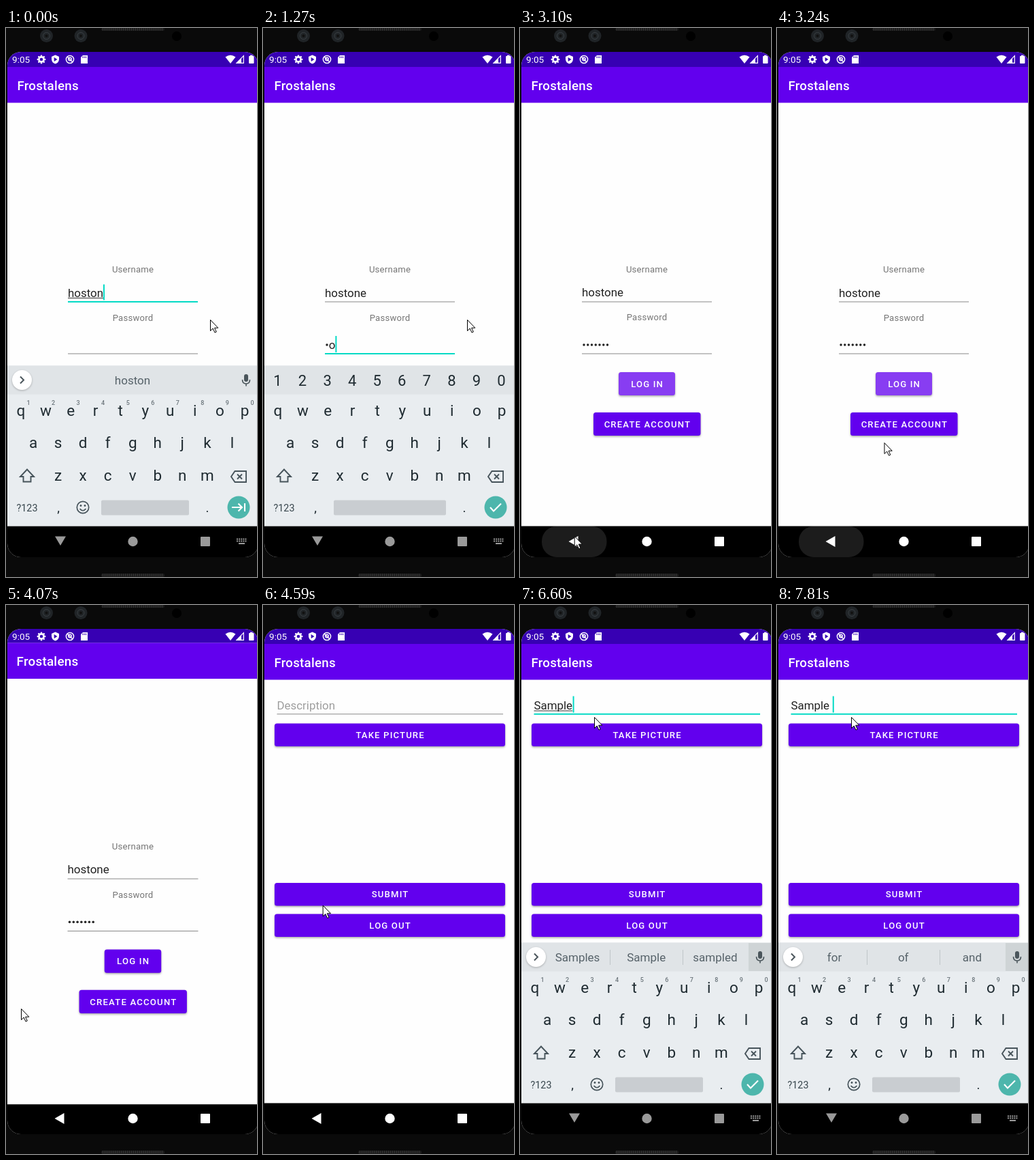
Write an HTML page with a canvas that moves like this. It is 369 px wide and 804 px high and loops after 8 s.

```html
<!DOCTYPE html>
<html lang="en">
<head>
<meta charset="utf-8">
<title>Login and post</title>
<style>
html, body { margin: 0; width: 100%; height: 100%; overflow: hidden; background: #0a0a0a; }
canvas { display: block; }
</style>
</head>
<body>
<canvas id="stage" width="369" height="804"></canvas>
<script>
const c = document.getElementById('stage').getContext('2d');
const TITLE = 'Frostalens', USER = 'hostone', NOTE = 'Sample ';
const PURPLE = '#6200ee', TEAL = '#03dac5', INK = '#1f2b31', DIM = '#566269';
const passKeys = [1210, 1270, 1420, 1510, 1660, 1720, 1800];
const noteKeys = [6160, 6240, 6310, 6390, 6460, 6530, 6810];
const pointer = [[0, 300, 427], [2450, 300, 427], [2760, 79, 745], [3090, 79, 745],
  [3340, 199, 534], [3740, 199, 534], [4070, 22, 591], [4390, 87, 448],
  [4560, 87, 448], [4860, 109, 164], [8000, 109, 164]];

const clamp = u => Math.max(0, Math.min(1, u));
const ramp = (t, a, b) => clamp((t - a) / (b - a));
const decel = u => 1 - (1 - u) * (1 - u);
const smooth = u => u * u * (3 - 2 * u);
const count = (keys, t) => keys.filter(k => k <= t).length;

// y of a cubic bezier at a given x
function bezier(p, x) {
  const at = (i, s) => {
    const r = 1 - s;
    return r * r * r * p[i] + 3 * r * r * s * p[i + 2] + 3 * r * s * s * p[i + 4] + s * s * s * p[i + 6];
  };
  let lo = 0, hi = 1;
  for (let i = 0; i < 24; i++) {
    const m = (lo + hi) / 2;
    if (at(0, m) < x) lo = m; else hi = m;
  }
  return at(1, lo);
}
const extraSlow = x => x < 1 / 6
  ? bezier([0, 0, .05, 0, .1333, .06, .1667, .4], x)
  : bezier([.1667, .4, .2083, .82, .25, 1, 1, 1], x);

function box(x, y, w, h, color, r = 0) {
  c.fillStyle = color;
  c.beginPath();
  c.roundRect(x, y, w, h, r);
  c.fill();
}
function disc(x, y, r, color) {
  c.fillStyle = color;
  c.beginPath();
  c.arc(x, y, r, 0, 7);
  c.fill();
}
function ring(x, y, r, color, w) {
  c.strokeStyle = color;
  c.lineWidth = w;
  c.beginPath();
  c.arc(x, y, r, 0, 7);
  c.stroke();
}
function fill(d, color, x = 0, y = 0) {
  c.save();
  c.translate(x, y);
  c.fillStyle = color;
  c.fill(new Path2D(d));
  c.restore();
}
function line(d, color, w, x = 0, y = 0) {
  c.save();
  c.translate(x, y);
  c.strokeStyle = color;
  c.lineWidth = w;
  c.stroke(new Path2D(d));
  c.restore();
}
function text(s, x, y, size, color, align = 'left', weight = 400, gap = 0) {
  c.font = `${weight} ${size}px Roboto, "Noto Sans", sans-serif`;
  c.letterSpacing = gap + 'px';
  c.textAlign = align;
  c.fillStyle = color;
  c.fillText(s, x, y);
}
const width = (s, size) => {
  c.font = `400 ${size}px Roboto, "Noto Sans", sans-serif`;
  c.letterSpacing = '0px';
  return c.measureText(s).width;
};
function button(label, x, y, w, h, color = PURPLE) {
  c.save();
  c.shadowColor = 'rgba(0,0,0,.35)';
  c.shadowBlur = 3;
  c.shadowOffsetY = 1.5;
  box(x, y, w, h, color, 3.5);
  c.restore();
  text(label, x + w / 2 + .6, y + h / 2 + 4.7, 13.1, '#fff', 'center', 500, 1.17);
}
function field(x, w, y, active) {
  if (active) box(x, y - 1, w, 2, TEAL);
  else box(x, y - .5, w, 1, '#8a8a8a');
}

function phone() {
  box(0, 0, 369, 804, '#0a0a0a');
  for (const y of [0, 799]) {
    box(140, y, 93, y ? 5 : 4, '#1d1d1d', 2);
    for (let x = 142; x < 232; x += 3) box(x, y, 1, 4, '#333');
  }
  for (const x of [59.5, 110]) {
    disc(x, 11.5, 9.5, '#202427');
    ring(x, 11.5, 5, '#3a3f43', 1);
    disc(x, 11.5, 2, '#111');
  }
  disc(251, 12, 7, '#000');
}

function shell() {
  box(2, 35, 369, 740, '#fefefe');
  box(2, 729.5, 369, 46, '#000');
}
function appBar() {
  box(2, 57, 369, 52.5, PURPLE);
  text(TITLE, 16.5, 91, 18.75, '#fff', 'left', 500, .23);
}

function loginScreen(t) {
  const pan = 49 * (decel(ramp(t, 1880, 2130)) - decel(ramp(t, 2880, 3110)));
  const inPass = t >= 620 && t < 1880;
  shell();
  c.save();
  c.beginPath();
  c.rect(2, 35, 369, 694.5);
  c.clip();
  c.translate(0, -pan);
  appBar();
  text('Username', 186.5, 358, 13.1, '#757575', 'center', 400, .23);
  text('Password', 186.5, 428.5, 13.1, '#757575', 'center', 400, .23);

  const name = t < 90 ? USER.slice(0, -1) : USER;
  text(name, 91, 393.5, 16.9, '#222');
  field(91, 191, 401, t < 620);
  if (t < 620) {
    const w = width(name, 16.9);
    box(91, 395, w, 1, '#333');
    box(91 + w, 375.5, 2, 23, TEAL);
  }

  const n = count(passKeys, t), dots = inPass ? Math.max(0, n - 1) : n;
  for (let i = 0; i < dots; i++) disc(94 + 5.75 * i, 464, 1.75, '#222');
  field(91, 191, 477, inPass);
  if (inPass) {
    let x = 91 + 5.75 * dots;
    if (n) {
      text(USER[n - 1], x, 470, 16.9, '#222');
      x += width(USER[n - 1], 16.9);
    }
    if (t < 1060 || t >= 1210) box(x, 451, 2, 24, TEAL);
  }

  button('LOG IN', 145, 504, 83, 34, t >= 1880 && t < 3440 ? '#883df2' : PURPLE);
  const press = ramp(t, 3440, 3665), fade = 1 - ramp(t, 3600, 3900);
  if (press > 0 && fade > 0) {
    c.save();
    c.beginPath();
    c.roundRect(145, 504, 83, 34, 3.5);
    c.clip();
    disc(199 - 12 * press, 534 - 13 * press, 10 + 40 * press, `rgba(255,255,255,${.24 * fade})`);
    c.restore();
  }
  button('CREATE ACCOUNT', 108, 563, 157.5, 34);
  c.restore();
  box(2, 35, 369, 22, '#3700b3');
}

function postScreen(t) {
  shell();
  box(2, 35, 369, 22, '#3700b3');
  appBar();
  const note = NOTE.slice(0, count(noteKeys, t)), w = width(note, 16.9);
  text(note || 'Description', 20.5, 152.5, 16.9, note ? '#222' : '#9e9e9e');
  field(20.5, 332.5, 159.7, t >= 4990);
  if (note && t < 6810) box(20.5, 154.5, w, 1, '#333');
  const off = t < 5090 || (t >= 5590 && t < 6090) || (t >= 7310 && t < 7810);
  if (!off) box(20.5 + w + .5, 133.5, 2, 24, TEAL);
  button('TAKE PICTURE', 17, 173.5, 339, 33.5);
  button('SUBMIT', 17, 407, 339, 33.5);
  button('LOG OUT', 17, 452.5, 339, 33.5);
}

function toolbar() {
  ring(71, 514, 5, DIM, 2);
  line('M75 518l6 6', DIM, 2.2);
  line('M121 508h10q3 0 3 3v7l-5 5h-8q-3 0-3-3v-9q0-3 3-3z', DIM, 1.7);
  line('M122 515q4 6 8 0M122.5 511.5h1M129 511.5h1', DIM, 1.5);
  text('GIF', 179.5, 520.5, 14, DIM, 'center', 900, .8);
  box(227, 508, 16, 16, DIM, 2);
  box(267, 505, 1, 21, '#c3c8cb');
  for (const x of [294.5, 301, 307.5]) disc(x, 516, 1.9, DIM);
}

function strip(t, post) {
  const word = (s, x) => text(s, x, 522, 17, DIM, 'center');
  const typed = count(noteKeys, t);
  if (post) box(336, 495, 35, 41, '#cfd4d6');
  c.save();
  c.shadowColor = 'rgba(0,0,0,.25)';
  c.shadowBlur = 3;
  c.shadowOffsetY = 1;
  disc(23.5, 515.5, 14.5, '#fff');
  c.restore();
  line(post && !typed ? 'M26 510.5l-5 5 5 5' : 'M21 510.5l5 5-5 5', '#4a555b', 2);

  if (!post) word(t < 90 ? USER.slice(0, -1) : USER, 186);
  else if (!typed) toolbar();
  else if (t < 6600) word(NOTE.slice(0, typed), 186);
  else {
    const words = t < 6810 ? ['Samples', 'Sample', 'sampled'] : ['for', 'of', 'and'];
    words.forEach((s, i) => word(s, 84.5 + 101.2 * i));
    box(132, 505, 1, 22, '#bfc5c8');
    box(239, 505, 1, 22, '#bfc5c8');
  }
  box(350, 507, 6, 11, '#4a555b', 3);
  line('M347.5 515q0 6 5.500 6t5.500-6M353 521v3.500', '#4a555b', 1.6);
}

function keyboard(t) {
  const post = t > 4590, pass = !post && t >= 620;
  const step = 36.55;
  box(2, 494.5, 369, 235, '#e9edf0');
  box(2, 494.5, 369, 42, '#e0e4e7');
  if (!pass) strip(t, post);
  [...'1234567890'].forEach((d, i) => {
    if (pass) text(d, 21.5 + step * i, 524, 22, INK, 'center');
    else text(d, 33 + step * i, 552, 9, '#6b757b', 'center', 500);
  });
  [['qwertyuiop', 22, 568], ['asdfghjkl', 40, 615], ['zxcvbnm', 76.5, 662.5]].forEach(([row, x, y]) =>
    [...row].forEach((k, i) => text(k, x + step * i, y, 22.5, INK, 'center')));
  text('?123', 31, 707.5, 14.3, '#37454c', 'center');
  text(',', 77, 708.5, 19, INK, 'center');
  text('.', 296, 708.5, 19, INK, 'center');
  line('M0-9.500L10 1H5.500V8.500H-5.500V1H-10Z', '#47545b', 1.9, 31, 656);
  line('M-11 0L-5.500-8H11V8H-5.500ZM-2-3.500l7 7M5-3.500l-7 7', '#47545b', 1.9, 342, 657);
  if (!pass) {
    ring(113, 702, 8.7, '#47545b', 1.7);
    disc(110, 699.5, 1.4, '#47545b');
    disc(116, 699.5, 1.4, '#47545b');
    line('M108.500 704q4.500 5.500 9 0', '#47545b', 1.7);
  }
  const left = pass ? 104 : 140;
  box(left, 691.5, 269 - left, 22, '#c9cdd1', 2);
  disc(342, 702, 16.5, '#4db6ac');
  const icon = t < 620 ? 'M-10 0H5M-.5-5.500L5 0L-.5 5.500M9-6V6'
    : post || t < 1880 ? 'M-8 0L-3 5.500L8-5.500'
    : 'M8-5V0H-8M-3.500-5L-8.500 0L-3.500 5';
  line(icon, '#fff', 2.1, 342, 702);
}

function statusIcons() {
  text('9:05', 9, 51, 13.6, '#fff');
  ring(52, 46, 3.6, '#fff', 2.6);
  for (let i = 0; i < 8; i++) {
    const a = i * Math.PI / 4;
    disc(52 + 5.3 * Math.cos(a), 46 + 5.3 * Math.sin(a), 1.2, '#fff');
  }
  fill('M0-6.500L5.500-4V0Q5 5 0 6.500Q-5 5-5.500 0V-4Z', '#fff', 72.5, 46);
  fill('M-1.800-3L3 0L-1.800 3Z', '#3700b3', 72.5, 46);
  ring(94, 46, 5.6, '#fff', 1.5);
  ring(94, 45.5, 2.3, '#fff', 1.4);
  line('M90 42l8 8', '#fff', 1.4);
  fill('M-2-6H5V6H-5V-3Z', '#fff', 115, 46);
  for (const x of [113, 115.3, 117.6]) box(x - .5, 41.5, 1, 2.5, '#3700b3');
  fill('M0 6L-7.500-3.500Q0-9 7.500-3.500Z', '#fff', 330, 46);
  line('M-5 5.300H5.300V-5.300Z', '#fff', 1.2, 344, 46);
  fill('M-6 6L2-2V6Z', '#fff', 344, 46);
  box(357, 41, 7.5, 11, '#fff', 1);
  box(359, 39.8, 3.5, 2, '#fff');
}

function navIcons(t) {
  const open = t < 2880 || t >= 5090, color = open ? '#9a9a9a' : '#fff';
  const ripple = ramp(t, 2790, 2900) * (1 - ramp(t, 3250, 3400));
  if (ripple) box(32, 729.5, 95.5, 45.5, `rgba(255,255,255,${.11 * ripple})`, 22);
  fill(open ? 'M72 744.500H88L80 758Z' : 'M85.500 744V760L71.500 752Z', color);
  disc(186.5, 752, 7.2, color);
  box(286, 745, 14, 14, color, 1);
  if (open) {
    for (let i = 0; i < 5; i++)
      for (let j = 0; j < 2; j++) box(339 + 3.1 * i, 747.5 + 3 * j, 2, 2, color);
    box(342, 754, 9, 2, color);
  }
}

function mouse(t) {
  const i = pointer.findIndex(p => p[0] > t), [a, x, y] = pointer[i - 1], [b, u, v] = pointer[i];
  const s = smooth(ramp(t, a, b));
  const d = 'M.5.5V16.500L4.200 13L7 19L9.300 18L6.600 12.200H11.800Z';
  const px = x + (u - x) * s, py = y + (v - y) * s;
  fill(d, '#fff', px, py);
  line(d, '#000', 1, px, py);
}

function scaled(k, draw, t) {
  c.save();
  c.translate(186.5, 405);
  c.scale(k, k);
  c.translate(-186.5, -405);
  draw(t);
  c.restore();
}

function frame(now) {
  const t = now % 8000;
  phone();
  c.save();
  c.beginPath();
  c.roundRect(2, 35, 369, 740, 20);
  c.clip();

  const move = extraSlow(ramp(t, 4040, 4440));
  if (t < 4440) scaled(1 + .1 * move, loginScreen, t);
  if (t > 4090) {
    c.globalAlpha = ramp(t, 4090, 4140);
    scaled(.85 + .15 * move, postScreen, t);
    c.globalAlpha = 1;
  }

  const shown = t < 4000 ? 1 - ramp(t, 2880, 3040) : decel(ramp(t, 5090, 5380));
  if (shown > 0) {
    c.save();
    c.beginPath();
    c.rect(2, 400, 369, 329.5);
    c.clip();
    c.globalAlpha = shown;
    c.translate(0, 47 * (1 - shown));
    keyboard(t);
    c.restore();
  }
  statusIcons();
  navIcons(t);
  c.restore();
  mouse(t);
  requestAnimationFrame(frame);
}
requestAnimationFrame(frame);
</script>
</body>
</html>
```
